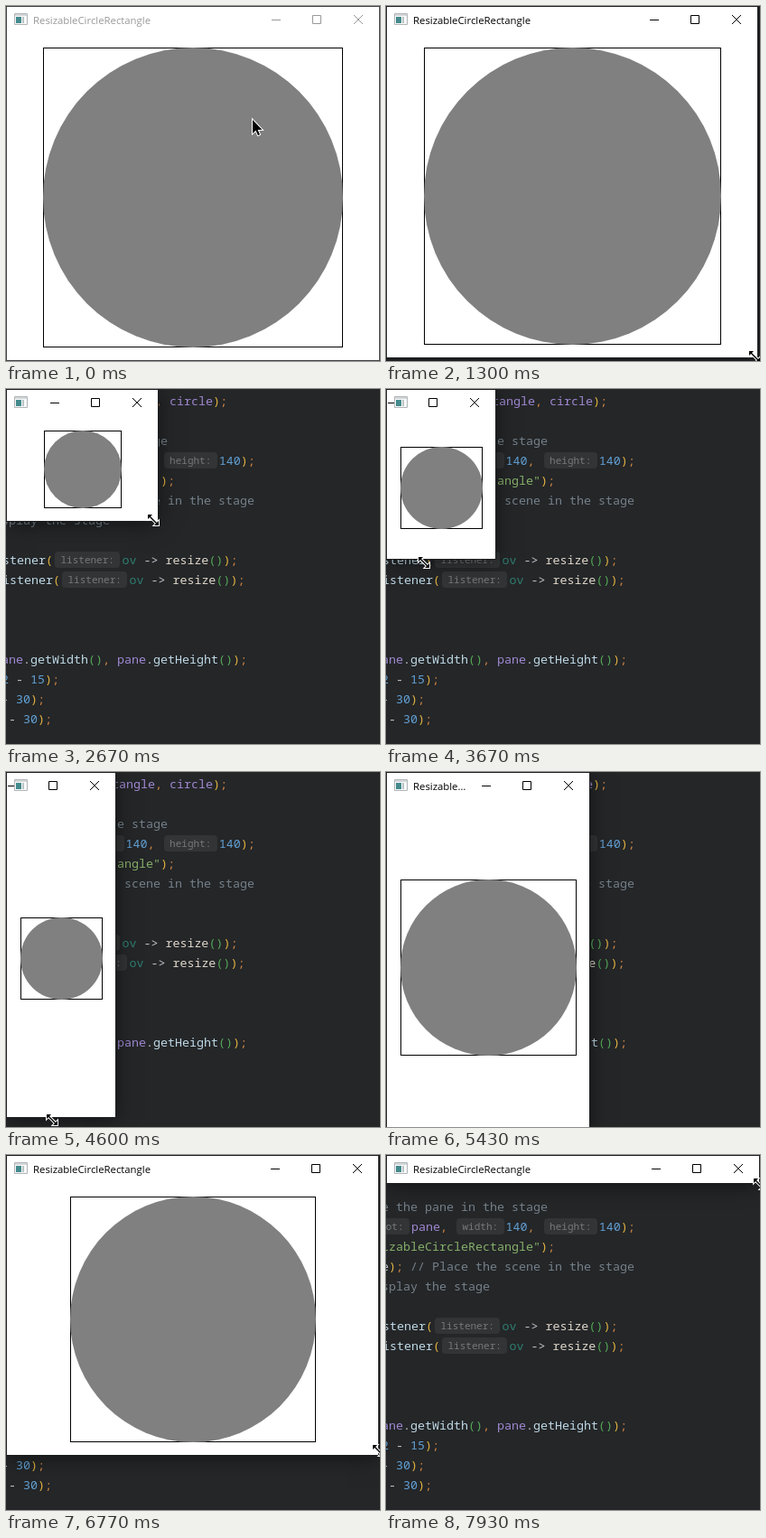
An HTML page that plays this animation: 414x393 px, repeating every 8000 ms.

```html
<!DOCTYPE html>
<html lang="en">
<head>
<meta charset="utf-8">
<title>Resizable window</title>
<style>
html, body { margin: 0; width: 100%; height: 100%; overflow: hidden; background: #242628; }
#stage { position: relative; width: 414px; height: 393px; overflow: hidden; background: #242628; }
#stage svg { position: absolute; left: 0; top: 0; overflow: visible; }

/* editor */
.row { position: absolute; top: calc(2px + 22px * var(--r)); left: var(--x);
  white-space: pre; font: 13.333px/22px "Noto Sans Mono", monospace; color: #c4c9ce; }
.row b { font-weight: 400; }
.row .v { color: #a088d2; } .row .m { color: #bfd9e6; } .row .f { color: #dfd6ca; }
.row .n { color: #62a0d4; } .row .s { color: #86b06a; } .row .c { color: #75808a; }
.row .o { color: #cc8242; } .row .y { color: #e3b341; } .row .g { color: #54a857; }
.row .t { color: #2f7d70; }
.row .hint { display: inline-block; margin: 0 2px; padding: 0 6.5px; border-radius: 4px; background: #323435;
  color: #76797b; font-size: 11px; line-height: 18px; vertical-align: 1px; }

/* window */
#win { position: absolute; left: 1px; top: 1px; background: #fff;
  color: #000; box-shadow: 0 0 0 1px #1c1d1e, 0 3px 22px rgba(0, 0, 0, .5); }
#win.idle { color: #999; box-shadow: 0 0 0 1px #3f4143; }
#title { position: absolute; left: 29px; top: 4px; overflow: hidden; text-overflow: ellipsis;
  white-space: nowrap; font: 11.35px/22px "Open Sans", "Noto Sans", sans-serif; }
</style>
</head>
<body>
<div id="stage">
  <div class="row" style="--r:0;--x:93px"><b class="v">rectangle</b><b class="o">,</b> <b class="v">circle</b><b class="y">)</b><b class="o">;</b></div>
  <div class="row" style="--r:2;--x:-5px"><b class="c">e the pane in the stage</b></div>
  <div class="row" style="--r:3;--x:-22px"><b class="hint">root:</b><b class="v">pane</b><b class="o">,</b> <b class="hint">width:</b><b class="n">140</b><b class="o">,</b> <b class="hint">height:</b><b class="n">140</b><b class="y">)</b><b class="o">;</b></div>
  <div class="row" style="--r:4;--x:-29px"><b class="s">ResizableCircleRectangle"</b><b class="y">)</b><b class="o">;</b></div>
  <div class="row" style="--r:5;--x:-5px">e<b class="y">)</b><b class="o">;</b> <b class="c">// Place the scene in the stage</b></div>
  <div class="row" style="--r:6;--x:-5px"><b class="c">splay the stage</b></div>
  <div class="row" style="--r:8;--x:-12px"><b class="m">istener</b><b class="y">(</b><b class="hint">listener:</b><b class="t">ov</b> -&gt; <b class="f">resize</b><b class="g">()</b><b class="y">)</b><b class="o">;</b></div>
  <div class="row" style="--r:9;--x:-12px"><b class="m">Listener</b><b class="y">(</b><b class="hint">listener:</b><b class="t">ov</b> -&gt; <b class="f">resize</b><b class="g">()</b><b class="y">)</b><b class="o">;</b></div>
  <div class="row" style="--r:13;--x:-13px"><b class="v">pane</b>.<b class="m">getWidth</b><b class="g">()</b><b class="o">,</b> <b class="v">pane</b>.<b class="m">getHeight</b><b class="g">()</b><b class="y">)</b><b class="o">;</b></div>
  <div class="row" style="--r:14;--x:-5px"><b class="n">2</b> - <b class="n">15</b><b class="y">)</b><b class="o">;</b></div>
  <div class="row" style="--r:15;--x:-5px">- <b class="n">30</b><b class="y">)</b><b class="o">;</b></div>
  <div class="row" style="--r:16;--x:3px">- <b class="n">30</b><b class="y">)</b><b class="o">;</b></div>

  <div id="win">
    <div id="title">ResizableCircleRectangle</div>
  </div>

  <svg width="414" height="393">
    <g id="shape">
      <rect id="box" fill="#fff" stroke="#000"/>
      <circle id="disc" fill="#808080"/>
    </g>
    <g id="buttons" fill="none">
      <path d="M-119 15.5h10M-73.5 10.5h9v9h-9z"/>
      <path d="M-28 10l10 10m0-10l-10 10"/>
    </g>
    <g id="icon">
      <path d="M9.5 8.5h14v12h-14z" fill="#f8f8f8" stroke="#b0b4b7"/>
      <path d="M10 9h13v2h-13z" fill="#d3d7da"/>
      <path d="M11 12h6v7h-6z" fill="#438a8c"/>
      <path d="M18 12h2v7h-2z" fill="#b9c4c6"/>
    </g>
    <g fill="#000" stroke="#fff" stroke-width="2" paint-order="stroke">
      <path id="arrow" d="M1 1v15l3.5-3.3 2.5 5.5 2-.9-2.4-5.4h4.9z"/>
      <path id="sizer" d="M1 1h5l-2 2 7 7 2-2v5h-5l2-2-7-7-2 2z"/>
    </g>
  </svg>
</div>

<script>
const LOOP = 8000, FRAME = 100 / 3;
const GRAB = 530, FOCUS = 1230, LAG = 33;
const MIN_RIGHT = 121, TITLE_BAR = 31, MARGIN = 30;
const $ = id => document.getElementById(id);

// time and place of the dragged corner
const path = [
  [1230, 413, 392], [1800, 318, 287], [2030, 247, 208], [2670, 168, 146],
  [2870, 135, 135], [3700, 42, 191], [4600, 50, 382], [5370, 209, 402],
  [5970, 379, 397], [6770, 412, 332], [7030, 412, 240], [7870, 413, 31]
];

const rate = (i, c) => (path[i + 1][c] - path[i][c]) / (path[i + 1][0] - path[i][0]);

// tangent that never overshoots
function slope(i, c) {
  if (i === 0 || i === path.length - 1) return 0;
  const a = rate(i - 1, c), b = rate(i, c);
  return a * b > 0 ? 2 * a * b / (a + b) : 0;
}

function corner(time) {
  const t = Math.min(Math.max(time, path[0][0]), path[path.length - 1][0]);
  const i = Math.max(1, path.findIndex(p => p[0] >= t)) - 1;
  const p = path[i], q = path[i + 1];
  const d = q[0] - p[0], u = (t - p[0]) / d, w = 1 - u;
  return [1, 2].map(c => Math.round(
    p[c] * (1 + 2 * u) * w * w + q[c] * u * u * (3 - 2 * u)
    + d * u * w * (slope(i, c) * w - slope(i + 1, c) * u)));
}

// the window trails the pointer a little
function pointer(t) {
  const [x, y] = corner(t + LAG);
  const end = [x - 7, y - 6];
  const u = Math.min(t / GRAB, 1), k = u * u * (3 - 2 * u);
  return [272, 125].map((from, i) => Math.round(from + (end[i] - from) * k));
}

function setAttrs(el, attrs) {
  for (const name in attrs) el.setAttribute(name, attrs[name]);
}

const show = (el, on) => { el.style.display = on ? '' : 'none'; };

function drawShape(right, bottom) {
  const side = Math.min(right - 1, bottom - TITLE_BAR) - MARGIN;
  show($('shape'), side > 0);
  if (side <= 0) return;
  const x = Math.floor((right + 1 - side) / 2) + .5;
  const y = Math.floor((bottom + TITLE_BAR - side) / 2) + .5;
  setAttrs($('box'), { x, y, width: side, height: side });
  setAttrs($('disc'), { cx: x + side / 2, cy: y + side / 2, r: side / 2 + .5 });
}

function draw(t) {
  const [x, bottom] = corner(t), right = Math.max(x, MIN_RIGHT);
  const idle = t < FOCUS, roaming = t < GRAB, titleWidth = right - 166;

  $('win').className = idle ? 'idle' : '';
  $('win').style.width = right - 1 + 'px';
  $('win').style.height = bottom - 1 + 'px';
  $('title').style.width = titleWidth + 'px';
  show($('title'), titleWidth > 12);
  setAttrs($('buttons'), { transform: `translate(${right})`, stroke: idle ? '#999' : '#000' });
  drawShape(right, bottom);

  show($('arrow'), roaming);
  show($('sizer'), !roaming);
  setAttrs($(roaming ? 'arrow' : 'sizer'), { transform: `translate(${pointer(t)})` });
}

const start = performance.now();
function tick() {
  const t = (performance.now() - start) % LOOP;
  draw(Math.round(Math.floor((t + 4) / FRAME) * FRAME / 10) * 10);
  requestAnimationFrame(tick);
}
tick();
</script>
</body>
</html>
```
